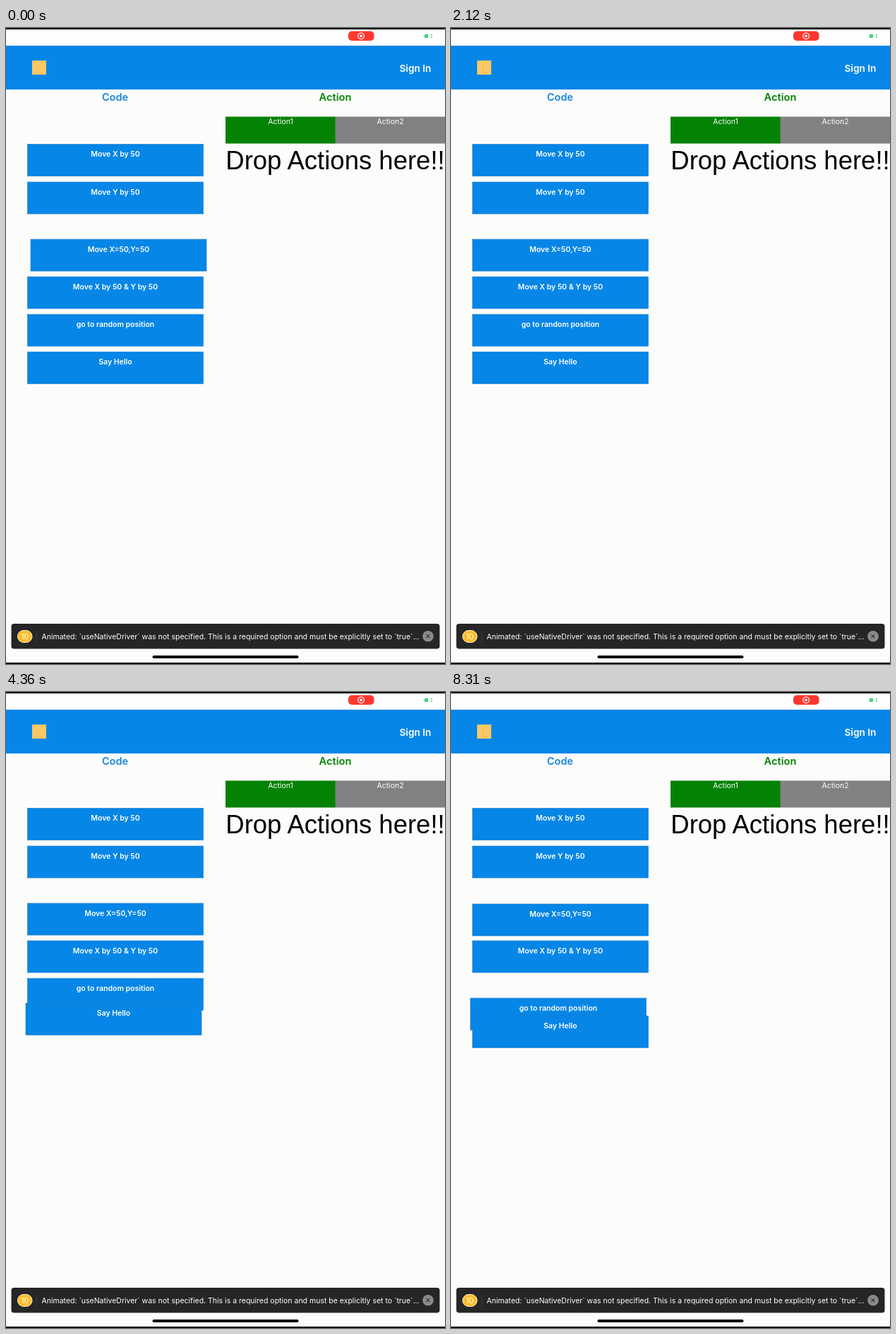
Recreate the animation shown at these times as an HTML page. Size 622 by 900 pixels, loop 8330 ms.

```html
<!DOCTYPE html>
<html lang="en">
<head>
<meta charset="utf-8">
<style>
  html, body { margin: 0; width: 100%; height: 100%; overflow: hidden; background: #fcfcfb; }
  svg { display: block; width: 622px; height: 900px; font-family: Inter, "Open Sans", sans-serif; }
  .mid { text-anchor: middle; }
  .bold { font-weight: 600; }
  .small { font-size: 10.5px; fill: #fff; }
</style>
</head>
<body>
<svg viewBox="0 0 622 900">
  <rect width="622" height="900" fill="#fcfcfb"/>
  <rect width="622" height="25" fill="#fefefe"/>
  <rect width="622" height="2"/>
  <rect y="898" width="622" height="2"/>

  <rect x="485" y="4.5" width="36.5" height="13.5" rx="5" fill="#fb3830"/>
  <circle cx="503" cy="11.3" r="4.3" fill="none" stroke="#fff" stroke-width="1.2"/>
  <circle cx="503" cy="11.3" r="1.8" fill="#fff"/>
  <path d="M593 9h5v5h-5zM602 9h2v1.5h-2zM602 12.5h2v1.5h-2z" fill="#45d47a"/>

  <rect y="25" width="622" height="62" fill="#0686e6"/>
  <rect x="37" y="46" width="20" height="20" fill="#fcc765"/>
  <text class="bold" x="602.5" y="62" font-size="13.7" fill="#fff" text-anchor="end">Sign In</text>

  <text class="mid bold" x="154.5" y="102.5" font-size="14.5" fill="#1687d8">Code</text>
  <g id="blocks"></g>

  <text class="mid bold" x="466.5" y="102.5" font-size="14.7" fill="#078107">Action</text>
  <rect x="311" y="125.5" width="156" height="38" fill="#048204"/>
  <rect x="466.5" y="125.5" width="155.5" height="38" fill="#828083"/>
  <text class="mid small" x="389" y="136">Action1</text>
  <text class="mid small" x="544.5" y="136">Action2</text>
  <text class="mid" x="466.5" y="200" font-size="36.5" font-family="'Liberation Sans', sans-serif">Drop Actions here!!</text>

  <rect x="7.5" y="843" width="607" height="35.5" rx="4" fill="#262628"/>
  <rect x="16.5" y="852.5" width="20.5" height="17" rx="8.5" fill="#fbbd28" stroke="#fff3d4"/>
  <text class="mid small" x="26.7" y="864.8">10</text>
  <path d="M43.5 852v18" stroke="#3c3c3e"/>
  <text class="small" x="50.5" y="864.5">Animated: `useNativeDriver` was not specified. This is a required option and must be explicitly set to `true`...</text>
  <circle cx="598" cy="860.7" r="7.8" fill="#8b8b8d"/>
  <path d="M595.5 858.2l5 5m0-5l-5 5" stroke="#303032" stroke-width="1.1"/>
  <rect x="207.5" y="888" width="207" height="4" rx="2"/>
</svg>
<script>
const LOOP = 8330;

// Each path lists [time, dx, dy] away from the resting place.
const blocks = [
  { label: "Move X by 50", y: 164 },
  { label: "Move Y by 50", y: 217.5 },
  { label: "Move X=50,Y=50", y: 298.5, path: [
    [0, 4.5, 0], [350, 0, 0], [5200, 0, 0], [5760, 45, -131], [6250, 80, -150],
    [6700, 45, -110], [7170, 0.5, 13], [7500, 0, 1], [LOOP, 0, 1]] },
  { label: "Move X by 50 & Y by 50", y: 351.5 },
  { label: "go to random position", y: 404.7, path: [
    [7900, 0, 0], [8310, -3, 28]] },
  { label: "Say Hello", y: 457.8, path: [
    [2400, 0, 0], [2960, 11, 125], [3450, 13, 150], [4360, -2.5, -18], [4750, 0, 0]] }
];

function make(parent, tag, attrs, text = "") {
  const node = document.createElementNS("http://www.w3.org/2000/svg", tag);
  for (const name in attrs) node.setAttribute(name, attrs[name]);
  node.textContent = text;
  return parent.appendChild(node);
}

const layer = document.getElementById("blocks");
for (const block of blocks) {
  block.node = make(layer, "g", {});
  make(block.node, "rect", { x: 30.5, y: 0.5, width: 249, height: 45, fill: "#0686e6", stroke: "#1d7fcf", "stroke-width": 0.7 });
  make(block.node, "text", { class: "mid bold small", x: 155, y: 18 }, block.label);
}

function offsetAt(path, time) {
  if (!path) return [0, 0];
  const next = path.findIndex(key => key[0] > time);
  if (next < 0) return path[path.length - 1].slice(1);
  if (next === 0) return path[0].slice(1);
  const [t0, x0, y0] = path[next - 1];
  const [t1, x1, y1] = path[next];
  const p = (time - t0) / (t1 - t0);
  const eased = p * p * (3 - 2 * p);
  return [x0 + (x1 - x0) * eased, y0 + (y1 - y0) * eased];
}

function snap(time) {
  const start = time < 6370 ? -120 : 6370;
  const into = (time - start) % 140;
  return Math.max(0, time - into + (into < 100 ? 0 : into < 120 ? 100 : 120));
}

function draw(time) {
  const t = snap(time);
  for (const { node, path, y } of blocks) {
    const [dx, dy] = offsetAt(path, t);
    node.setAttribute("transform", `translate(${dx} ${y + dy})`);
  }
}

const began = performance.now();
function tick() {
  draw((performance.now() - began) % LOOP);
  requestAnimationFrame(tick);
}
draw(0);
requestAnimationFrame(tick);
</script>
</body>
</html>
```
